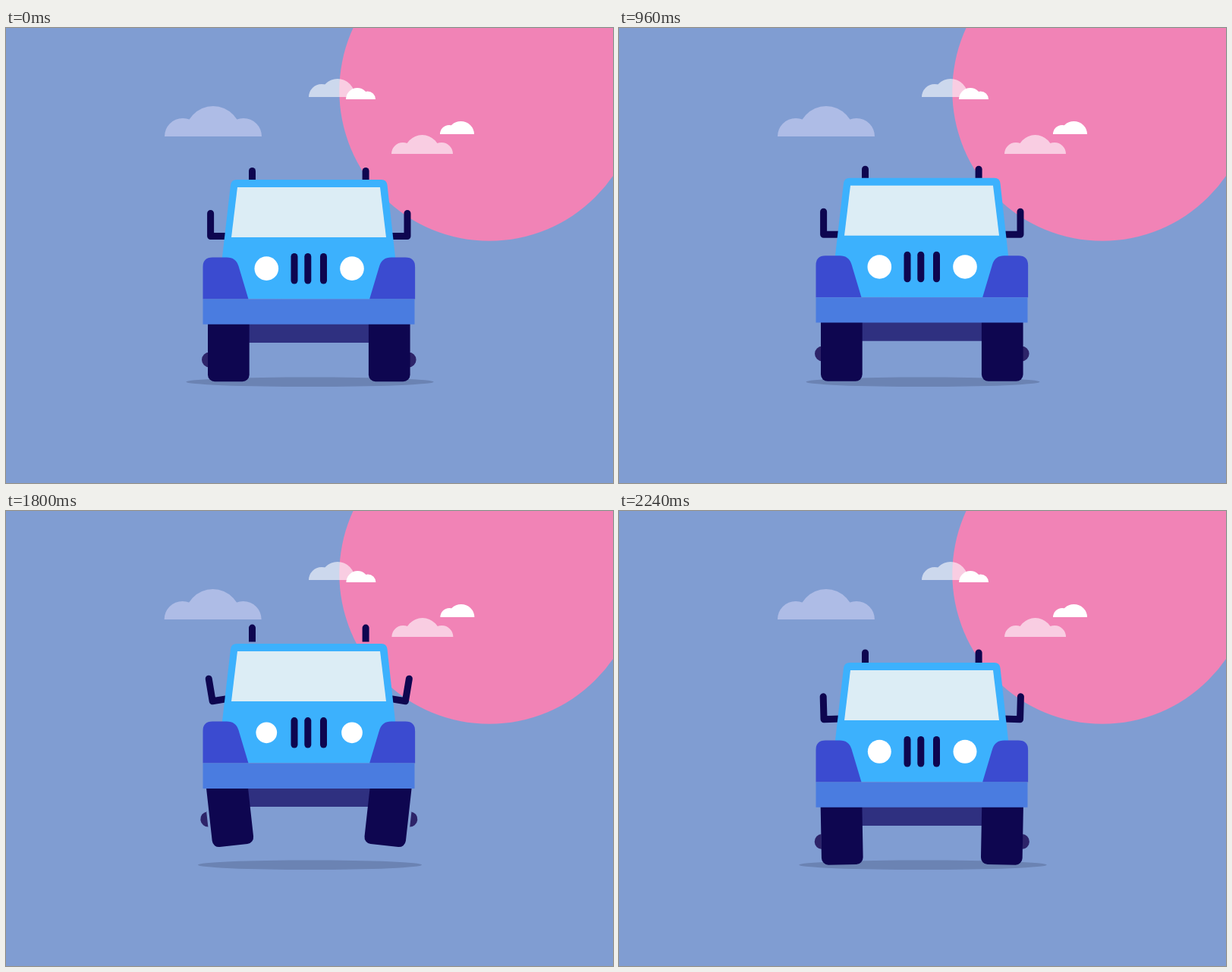
These frames come from a looping animation (800 by 600 pixels, 2.26 s). An HTML page with a canvas:

```html
<!DOCTYPE html>
<html lang="en">
<head>
<meta charset="utf-8">
<title>Hopping car</title>
<style>
  html, body { margin: 0; width: 100%; height: 100%; overflow: hidden; background: #809dd2; }
  canvas { display: block; }
</style>
</head>
<body>
<canvas id="stage" width="800" height="600"></canvas>
<script>
const ctx = document.getElementById('stage').getContext('2d');
const LOOP = 2260, HOP = 1680, AIR = 480, SHAKE = 93.2, MID = 399.3;
const TAU = Math.PI * 2;
const DARK = '#0e0650';

function fill(color, trace) {
  ctx.beginPath();
  trace();
  ctx.fillStyle = color;
  ctx.fill();
}
const rect = (color, x, y, w, h, r = 0) => fill(color, () => ctx.roundRect(x, y, w, h, r));
const ellipse = (color, x, y, rx, ry = rx) => fill(color, () => ctx.ellipse(x, y, rx, ry, 0, 0, TAU));

function at(dx, dy, draw) {
  ctx.save();
  ctx.translate(dx, dy);
  draw();
  ctx.restore();
}

function turned(x, y, degrees, draw) {
  ctx.save();
  ctx.translate(x, y);
  ctx.rotate(degrees * Math.PI / 180);
  ctx.translate(-x, -y);
  draw();
  ctx.restore();
}

function bothSides(draw) {
  draw();
  ctx.save();
  ctx.translate(2 * MID, 0);
  ctx.scale(-1, 1);
  draw();
  ctx.restore();
}

// Half discs [x, rx, ry] standing on one base line.
function cloud(color, base, bumps) {
  fill(color, () => {
    for (const [x, rx, ry] of bumps) {
      ctx.moveTo(x - rx, base);
      ctx.ellipse(x, base, rx, ry, 0, Math.PI, TAU);
      ctx.closePath();
    }
  });
}

function sky(swing) {
  const drift = 0.6 * swing, veil = 'rgba(255,255,255,.6)';
  rect('#809dd2', 0, 0, 800, 600);
  ellipse('#f183b6', 637, 83, 197.7);
  at(-drift, 0, () => cloud('#aebce6', 143, [[233, 24, 24], [273, 38, 40], [313, 24, 24]]));
  cloud(veil, 91, [[416, 17, 17], [437, 23, 24]]);
  at(drift, 0, () => {
    cloud('#fff', 94, [[463, 15, 15], [476.5, 10.5, 10.5]]);
    cloud('#fff', 140, [[584, 12, 12], [599.5, 17.5, 17]]);
    cloud(veil, 166, [[523, 15, 15], [548.5, 24, 25], [574, 15, 15]]);
  });
}

function sideMirror() {
  ctx.beginPath();
  ctx.moveTo(269.6, 244.5);
  ctx.lineTo(269.6, 274.5);
  ctx.lineTo(292, 274.5);
  ctx.strokeStyle = DARK;
  ctx.lineWidth = 9;
  ctx.lineCap = ctx.lineJoin = 'round';
  ctx.stroke();
}

function shell() {
  fill('#3cb1fd', () => {
    ctx.moveTo(285, 357);
    ctx.lineTo(285, 302);
    ctx.lineTo(296, 207);
    ctx.quadraticCurveTo(297, 200, 304, 200);
    ctx.lineTo(495, 200);
    ctx.quadraticCurveTo(501.5, 200, 502.5, 207);
    ctx.lineTo(513, 302);
    ctx.lineTo(513, 357.5);
  });
  fill('#dcedf5', () => {
    ctx.moveTo(305, 210);
    ctx.lineTo(493, 210);
    ctx.lineTo(501, 276);
    ctx.lineTo(297, 276);
  });
}

function fender() {
  fill('#3b4bd0', () => {
    ctx.moveTo(259.5, 357.5);
    ctx.lineTo(259.5, 315);
    ctx.quadraticCurveTo(259.5, 302.5, 272, 302.5);
    ctx.lineTo(291, 302.5);
    ctx.quadraticCurveTo(303, 302.5, 306.5, 314);
    ctx.lineTo(319.5, 357.5);
  });
}

function axleEnd() {
  fill('#2d2469', () => {
    ctx.moveTo(267, 447);
    ctx.arc(268, 437, 10, Math.PI / 2, Math.PI * 1.5);
    ctx.lineTo(267, 427);
  });
}

function draw(t) {
  const phase = (t - 3.7) / SHAKE;
  const shake = (amount, peak) => t < HOP
    ? amount * (Math.cos(TAU * (phase - peak)) - Math.cos(TAU * peak)) : 0;
  const arc = length => t > HOP && t < HOP + length
    ? Math.sin(Math.PI * (t - HOP) / length) : 0;

  const hop = arc(AIR);
  const swing = arc(LOOP - HOP) / 0.964;
  const lift = -35 * hop;
  const bodyY = lift - shake(2, 0.5);

  sky(swing);
  const spread = 1 - 0.135 * hop - shake(0.05, 0.5);
  ellipse('#6b83b3', 400.5, 466.7, 163.3 * spread, 6.3);

  at(0, bodyY, () => rect('#2f3080', 305, 388, 188, 27));
  bothSides(() => {
    at(-2.7 * swing, lift - 8 * swing - shake(5, 0.4),
      () => turned(262, 437, -10 * swing, axleEnd));
    at(0, lift - shake(1.3, 0.6),
      () => turned(293.3, 407, -10 * swing, () => rect(DARK, 266, 372, 54.7, 94.3, 9)));
  });

  at(0, bodyY, () => {
    bothSides(() => {
      rect(DARK, 320, 184 - 15 * swing, 9, 23, [4.5, 4.5, 0, 0]);
      turned(278, 259.5, -15 * swing, sideMirror);
    });
    shell();
    bothSides(fender);
    rect('#4a7ce0', 259.5, 357.5, 279, 33.3);
    for (const x of [343.3, 456]) ellipse('#fff', x, 317.2, 15.8 - 3.1 * swing);
    for (const x of [375.5, 393.3, 414]) rect(DARK, x, 297, 9, 40.5, 4.5);
  });
}

function frame() {
  draw(performance.now() % LOOP);
  requestAnimationFrame(frame);
}
frame();
</script>
</body>
</html>
```
